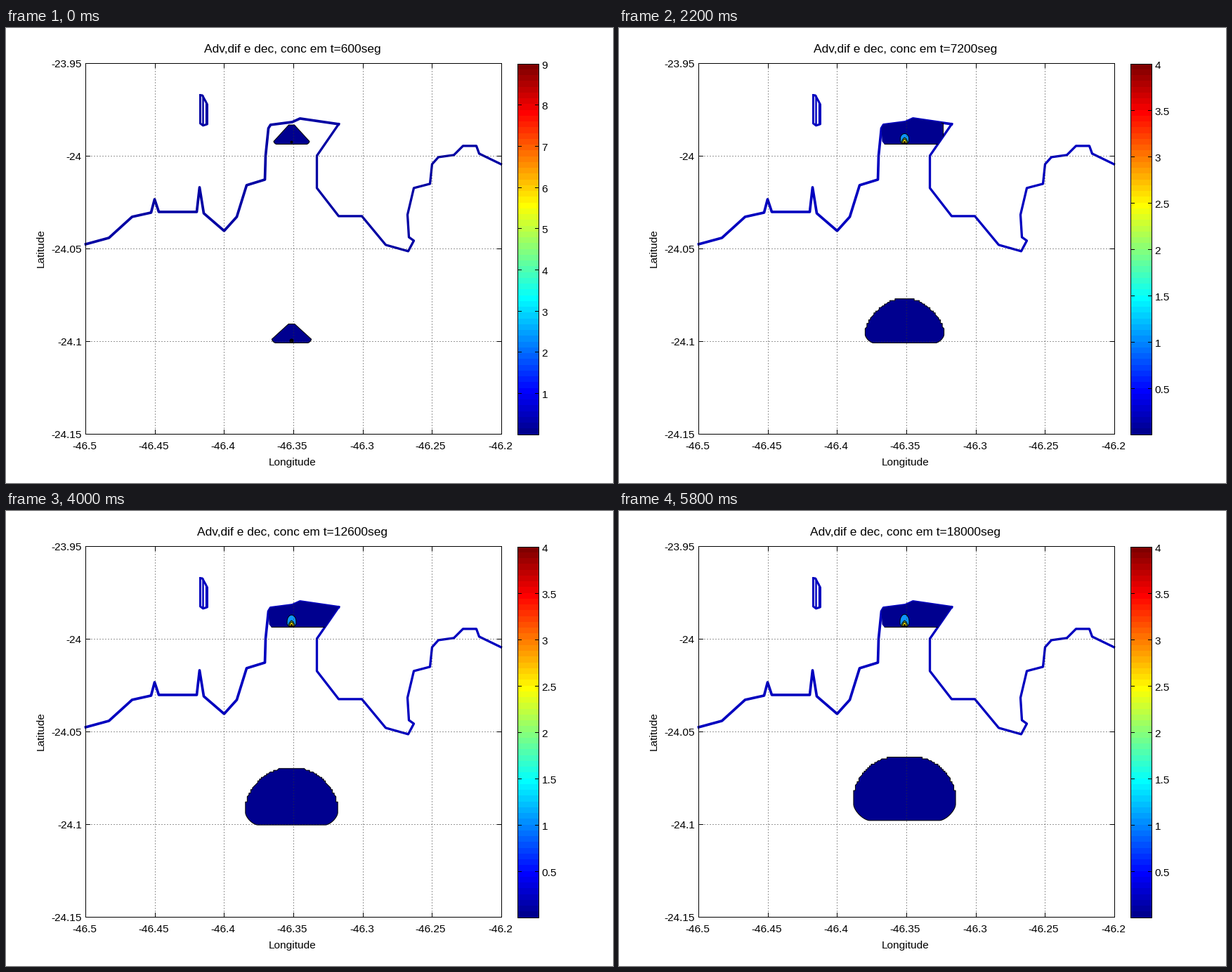
Write a matplotlib script that moves like this. It is 864 px wide and 648 px high and loops after 6000 ms.

```python
import numpy as np
import matplotlib.pyplot as plt
from matplotlib.animation import FuncAnimation
from matplotlib.patches import Circle, Polygon, Rectangle

W, H = 864, 648
FRAMES, STEP = 30, 200
NAVY, AZURE, YELLOW = (0, 0, 0.5625), (0.05, 0.58, 1), (1, 0.9, 0)
CX = 406
LEFT, RIGHT, TOP, BOTTOM = 112, 704, 49, 577
BAR_L, BAR_R, BAR_T, BAR_B = 727, 757, 50, 578

plt.rcParams["font.family"] = "Liberation Sans"
fig = plt.figure(figsize=(W / 72, H / 72), dpi=72, facecolor="white")
ax = fig.add_axes([0, 0, 1, 1])
ax.set_xlim(-0.5, W - 0.5)
ax.set_ylim(H - 0.5, -0.5)
ax.axis("off")


def line(xs, ys, lw=1, color="black", z=5, **kw):
    return ax.plot(xs, ys, color=color, lw=lw, zorder=z, **kw)[0]


def label(x, y, s, size=15.4, ha="center", **kw):
    return ax.text(x, y, s, fontsize=size, ha=ha, va="baseline", zorder=6, **kw)


def box(x0, y0, x1, y1):
    ax.add_patch(Rectangle((x0, y0), x1 - x0, y1 - y0, fill=False, ec="black", lw=1, zorder=5))


def jet(i):
    """Banded rainbow of 64 steps, i from 1."""
    def ramp(k):
        return np.clip(min(k, 48 - k), 0, 16) / 16
    return ramp(i - 24), ramp(i - 8), ramp(i + 8)


# Map axes
box(LEFT, TOP, RIGHT, BOTTOM)
dots = dict(dashes=(1, 3), color="0.2", z=4, dash_capstyle="butt")
for k in range(7):
    x = round(LEFT + k * (RIGHT - LEFT) / 6)
    label(x - 1, 599.5, f"{-46.5 + 0.05 * k:.4g}")
    line([x, x], [BOTTOM, BOTTOM - 6])
    line([x, x], [TOP, TOP + 6])
    if 0 < k < 6:
        line([x, x], [BOTTOM, TOP], **dots)
for k in range(5):
    y = TOP + k * (BOTTOM - TOP) / 4
    label(107.5, y + 7, f"{-23.95 - 0.05 * k:.4g}", ha="right")
    line([LEFT, LEFT + 6], [y, y])
    line([RIGHT, RIGHT - 6], [y, y])
    if 0 < k < 4:
        line([LEFT, RIGHT], [y, y], **dots)
label(407.5, 622, "Longitude")
label(53, 313, "Latitude", rotation=90, rotation_mode="anchor")
title = label(407, 34.5, "", 17.35)

# Colour bar
band = (BAR_B - BAR_T) / 64
for i in range(64):
    ax.add_patch(Rectangle((BAR_L, BAR_B - (i + 1) * band), BAR_R - BAR_L, band,
                           color=jet(i + 1), lw=0, zorder=3, antialiased=False))
box(BAR_L, BAR_T, BAR_R, BAR_B)


def scale(top, step):
    parts = []
    for v in np.arange(step, top + step / 2, step):
        y = BAR_B - v / top * (BAR_B - BAR_T)
        parts.append(label(762, y + 7, f"{v:g}", ha="left"))
        for a, b in ((BAR_L, BAR_L + 5), (BAR_R, BAR_R - 5)):
            parts.append(line([a, b], [y, y]))
    return parts


scales = [scale(9, 1), scale(4, 0.5)]

# Coast in three stretches, and the island
west = [(113, 307), (146, 298), (179, 268), (206, 262), (211, 243), (217, 261), (271, 261),
        (275, 226), (281, 263), (310, 288), (328, 268), (342, 223), (368, 215), (369, 181)]
cove = [(373, 142), (376, 137), (407, 133), (418, 128), (473, 136)]
east = [(442, 181), (442, 227), (473, 267), (506, 267), (540, 308), (572, 317), (580, 302),
        (573, 297), (571, 265), (580, 227), (603, 221), (606, 193), (615, 183), (637, 180),
        (650, 167), (669, 167), (673, 178), (704, 193)]
isle = [(276, 95), (279, 95), (286, 108), (286, 136), (280, 138), (276, 135), (276, 95)]


def coastline(points, lw):
    return line(*(np.array(points) + [0, 0.4]).T, lw=lw, z=1)


coast = [coastline(west + cove, 3.7), coastline(cove[-1:] + east, 3.3), coastline(isle, 3),
         coastline([(279, 96), (279, 137)], 2.5), coastline([(283, 102), (283, 137)], 1.3)]
bay = Polygon(cove + [(453, 166), (378, 166), (374, 161)], transform=ax.transData)


def dome(top, hw, yw, ys, bw, base, p=2.0, flat=0.0, snap=0.0):
    """Rounded hill: crown above yw, straight sides to ys, bevel to the base."""
    a = np.linspace(0, np.pi / 2, 60)
    x = flat + (hw - flat) * np.cos(a) ** (2 / p)
    y = yw - (yw - top) * np.sin(a) ** (2 / p)
    if snap:
        x = hw - np.round((hw - x) / snap) * snap
        y = top + np.round((y - top) / snap) * snap
    b = np.linspace(np.pi / 2, 0, 12)
    x = np.r_[bw + (hw - bw) * np.cos(b) ** 1.3, x]
    y = np.r_[ys + (base - ys) * np.sin(b) ** 1.3, y]
    return np.c_[np.r_[CX + x, CX - x[::-1]], np.r_[y, y[::-1]]]


def cap(top, hw, base, p=1.3):
    return dome(top, hw, base - 1.5, base - 1.5, hw - 0.5, base, p)


def shape(color, z):
    return ax.add_patch(Polygon([(0, 0), (0, 1), (1, 1)], fc=color, ec="black", lw=1, zorder=z))


south, north = shape(NAVY, 2), shape(NAVY, 2)
north.set_clip_path(bay)
core = [shape(c, 3 + k / 10) for k, c in enumerate([AZURE, (0.5, 1, 0.5), YELLOW, (0.6, 0, 0)])]
puff = shape(AZURE, 3)
spots = [ax.add_patch(Circle((CX, y), r, fc="black", zorder=3)) for y, r in ((162, 2), (445, 3))]


def south_plume(s, snap):
    base = 448 - 0.7 * max(0, s - 19)
    top = 433.3 - 11.65 * s ** 0.5 - 0.65 * s
    hw = 28 * s ** 0.28
    bevel = 4.5 + 0.6 * s
    ys = base - bevel
    return dome(top, hw, ys - 0.35 * s, ys, hw - bevel, base, s ** 0.18, 4 + 0.35 * s, snap)


def north_plume(s, snap):
    hw = 13.5 + 12 * s ** 0.5
    return dome(140 - 2.5 * s, hw, max(136, 163 - 2 * s), 161, hw - 4, 165, s ** 0.2, 4, snap)


def draw(n):
    s = n + 1
    first = n == 0
    title.set_text(f"Adv,dif e dec, conc em t={600 * s}seg")
    for parts, on in zip(scales, (first, not first)):
        for part in parts:
            part.set_visible(on)
    for c in coast:
        c.set_color((0, 0, 0.64 if first else 0.75))

    snap = 0 if first else 2.5
    south.set_xy(south_plume(s, snap))
    north.set_xy(north_plume(s, snap))

    top = 146 + 12 * np.exp(-n / 10)
    hw = 6.5 - 2.5 * np.exp(-n / 6)
    tip = max(top + 2, 155.5)
    core[0].set_xy(dome(top, hw, max(top + 4, 157), 160, 3.5, 163.5))
    core[1].set_xy(cap(tip, 4.5, 163.5))
    core[2].set_xy(cap(tip + 2, 3, 163.5))
    core[3].set_xy(cap(161, 1, 163.5))
    puff.set_xy(cap(438, 4.7, 444, 2))

    for part in spots:
        part.set_visible(first)
    for part in core:
        part.set_visible(not first)
    puff.set_visible(1 <= n <= 5)


anim = FuncAnimation(fig, draw, init_func=lambda: draw(0), frames=FRAMES,
                     interval=STEP, repeat=True, repeat_delay=0, blit=False)
plt.show()
```
